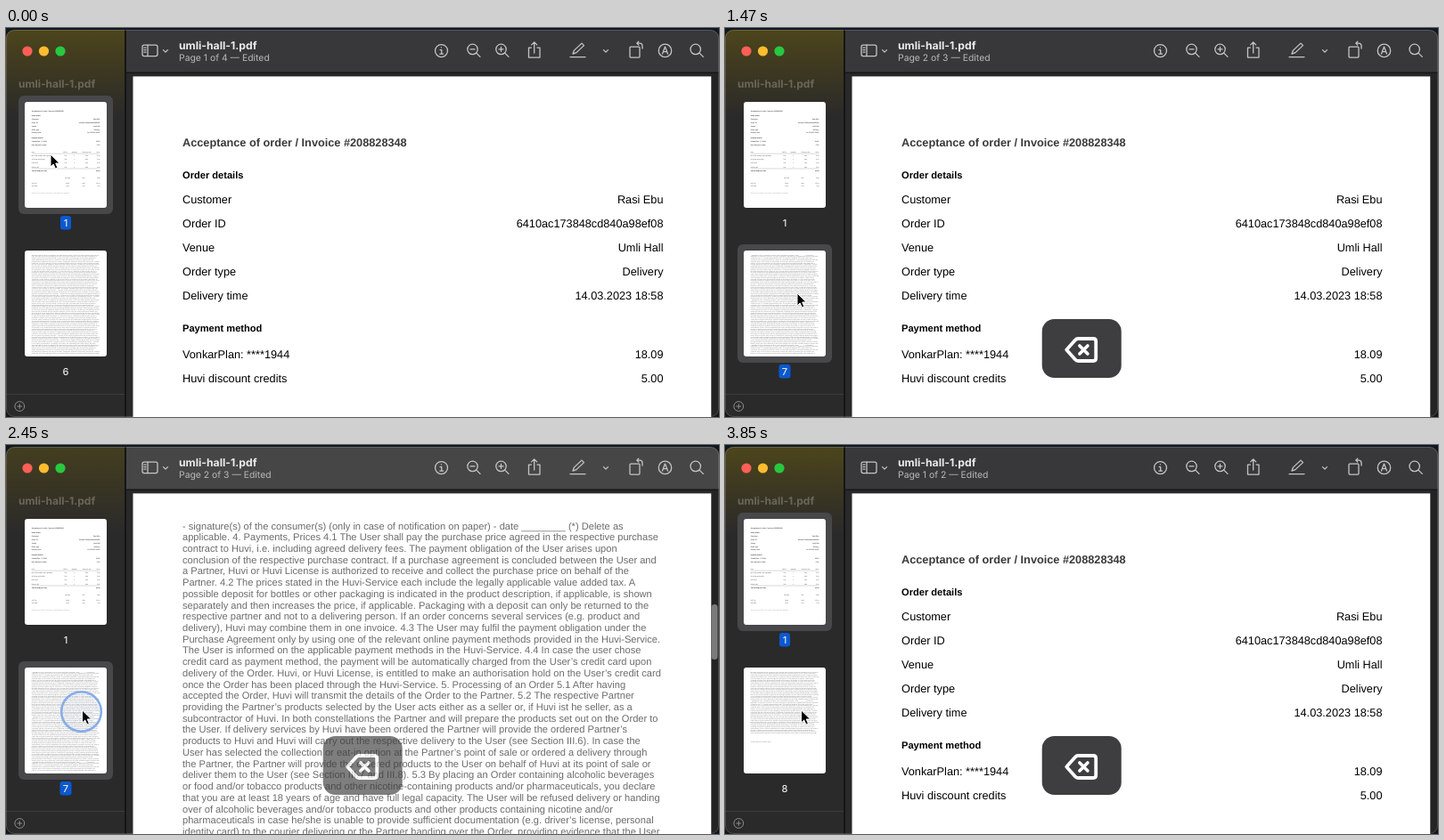
Recreate the animation shown at these times as an HTML page. Size 800x437 px, loop 3.99 s.

```html
<!DOCTYPE html>
<html lang="en">
<head>
<meta charset="utf-8">
<title>Deleting PDF pages</title>
<style>
  html, body { margin: 0; width: 100%; height: 100%; overflow: hidden; background: #0d1822; }
  svg { display: block; width: 800px; height: 437px; text-rendering: geometricPrecision; }
  .ui { font-family: Inter, sans-serif; }
  .doc { font: 12.73px "Liberation Sans", Arial, sans-serif; fill: #000; }
  .doc .title { font-weight: 700; fill: #3a3a3a; }
  .doc .head { font-weight: 700; font-size: 11.1px; }
  .doc .small { font-size: 11.1px; fill: #333; }
  .doc .pale { font-size: 11.1px; fill: #999; }
  .doc .terms { font-size: 11.12px; fill: #6c6c6c; }
  .icons { fill: none; stroke: #c4c4c4; stroke-width: 1.3; stroke-linecap: round; stroke-linejoin: round; }
  .label { font-size: 11px; font-weight: 500; fill: #e8e8e8; text-anchor: middle; }
</style>
</head>
<body>
<svg viewBox="0 0 800 437" xmlns="http://www.w3.org/2000/svg">
  <defs>
    <linearGradient id="olive" x1="0" y1="0" x2="0" y2="1">
      <stop offset="0" stop-color="#4d461c"/>
      <stop offset=".4" stop-color="#3f3a20"/>
      <stop offset="1" stop-color="#2a2a2a"/>
    </linearGradient>
    <clipPath id="frame"><rect y="2" width="800" height="435" rx="9"/></clipPath>
    <clipPath id="sheet"><rect x="143" y="55" width="649" height="839"/></clipPath>
    <g id="invoice" class="doc"><path d="M198 465h539.500M198 584h539.500" stroke="#777" stroke-width="2"/></g>
    <g id="terms6" class="doc"></g>
    <g id="terms7" class="doc"></g>
    <g id="terms8" class="doc"></g>
  </defs>

  <rect width="800" height="437" fill="#0d1822"/>
  <g clip-path="url(#frame)">
    <rect width="800" height="437" fill="#29292a"/>

    <!-- document -->
    <rect x="142.5" y="54.4" width="649" height="383" fill="#fff"/>
    <use id="page" href="#invoice"/>
    <rect x="791.5" y="50" width="8.5" height="387" fill="#242425"/>
    <rect id="scroller" x="791.5" width="7" rx="3.5" fill="#7b7b7b"/>

    <!-- sidebar -->
    <rect width="134" height="437" fill="#2a2a2a"/>
    <rect id="tint" width="134" height="100" fill="url(#olive)"/>
    <path d="M0 411.5H134" stroke="#3c3c3c"/>
    <rect x="133" width="2" height="437" fill="#151515"/>
    <circle cx="24" cy="26" r="5.6" fill="#ff5f57"/>
    <circle cx="42.5" cy="26" r="5.6" fill="#febc2e"/>
    <circle cx="61" cy="26" r="5.6" fill="#28c840"/>
    <text class="ui" x="14" y="67" font-size="12" font-weight="700" fill="#6a675a">umli-hall-1.pdf</text>
    <g fill="none" stroke="#8b8b8b"><circle cx="15.3" cy="425" r="5.4"/><path d="M12.5 425h5.6M15.3 422.2v5.6"/></g>

    <g class="ui">
      <rect id="sel1" x="14" y="76" width="106" height="133" rx="6" fill="#48484a"/>
      <rect id="sel2" x="14" y="243" width="106" height="133" rx="6" fill="#48484a"/>
      <rect x="21" y="83" width="92" height="119" rx="3" fill="#fff"/>
      <rect x="21" y="250" width="92" height="119" rx="3" fill="#fff"/>
      <g transform="translate(21 83) scale(.1418) translate(-143 -55)" clip-path="url(#sheet)"><use href="#invoice"/></g>
      <g transform="translate(21 250) scale(.1418) translate(-143 -55)" clip-path="url(#sheet)"><use id="thumb" href="#terms6"/></g>
      <rect id="badge1" x="61" y="211" width="12" height="15.5" rx="3" fill="#0a59d1"/>
      <rect id="badge2" x="60.5" y="378" width="13" height="15.5" rx="3" fill="#0a59d1"/>
      <text class="label" x="67" y="222.8">1</text>
      <text class="label" id="number" x="67" y="389.8">6</text>
    </g>

    <!-- toolbar -->
    <rect id="bar" x="135" y="2" width="665" height="48"/>
    <rect x="135" y="49.5" width="665" height="1.5" fill="#171717"/>
    <g class="ui">
      <text x="194" y="24" font-size="12.2" font-weight="700" fill="#ececec">umli-hall-1.pdf</text>
      <text id="status" x="194" y="37" font-size="10.4" fill="#b9b9b9"></text>
    </g>
    <g class="icons" transform="translate(0 -.4)">
      <rect x="153" y="19.5" width="17" height="12.5" rx="2"/>
      <path d="M159 19.5v12.5M155 22.5h2M155 25h2M155 27.5h2M176.5 25l2.5 2.5 2.5-2.5M670.5 25l2.5 2.5 2.5-2.5"/>
      <circle cx="488.5" cy="26" r="7"/><path d="M487 25h1.7v4.5M486.8 29.5h3.8M488.4 22.3v.2"/>
      <circle cx="523.5" cy="24.3" r="5.7"/><path d="M527.7 28.5l4.3 4.3M521 24.3h5"/>
      <circle cx="555.5" cy="24.3" r="5.7"/><path d="M559.7 28.5l4.3 4.3M553 24.3h5M555.5 21.8v5"/>
      <path d="M589.5 22.5h-3v11h12.5v-11h-3M592.7 28.5v-12M589.7 19.3l3-3 3 3"/>
      <path d="M636 29.5l1.5-4 8.500-8 2.500 2.500-8.500 8zM633 33h17"/>
      <rect x="700" y="21.5" width="11" height="12" rx="1"/><path d="M708 17.500h3q3 0 3 3v3M709.800 15.500l-2 2 2 2"/>
      <circle cx="739.5" cy="25.8" r="7.2"/><path d="M736.5 29.5l3-8 3 8M737.5 27h4"/>
      <circle cx="773.7" cy="24.3" r="5.7"/><path d="M778 28.5l4.3 4.3"/>
    </g>
    <rect x=".5" y="2.5" width="799" height="434" rx="9" fill="none" stroke="#fff" stroke-opacity=".16"/>

    <!-- key press, click ring, pointer -->
    <g id="key">
      <rect x="-44.5" y="-33" width="89" height="66" rx="14" fill="#3e3e40"/>
      <g fill="none" stroke="#fff" stroke-linecap="round" stroke-linejoin="round">
        <path d="M-17 1.500l10-11.200q1-1.300 3-1.300h17q3 0 3 3v19q0 3-3 3h-17q-2 0-3-1.300z" stroke-width="3.800"/>
        <path d="M-2.300-3l9 9M6.700-3l-9 9" stroke-width="3.600"/>
      </g>
    </g>
    <circle id="ring" cx="84.5" cy="299.5" r="22.3" fill="#a9c3f3" fill-opacity=".08" stroke="#86ade8" stroke-width="2.6"/>
    <path id="pointer" d="M0 0v14l3.200-3 2.200 5 2.500-1.100-2.200-4.900h4.500z" fill="#000" stroke="#fff" stroke-width="1"/>
  </g>
</svg>
<script>
const $ = id => document.getElementById(id);

const revocation = `Agreement will be stored in compliance with data protection laws. 2.4 After the Order has been placed by the
User, the Order cannot be cancelled by the User. You cannot withdraw or cancel an Order for products or
delivery services once you have placed it, unless such right is provided under the Purchase agreement
and/or applicable law. If the User is a consumer within the meaning of Section 13 Velman Title Code
(Velmanisches Titelgesetz) the right of revocation, if applicable, as further referenced in Section III.3. remains
unaffected. 2.5 Prior to placing an Order you should carefully review your selection. Before placing the Order
the User may review and change the details of his/her Order at any time. 2.6 When you use the Huvi-Service,
there may be a minimum value for purchase required, in which case you will be notified thereof before you
place the Order on the Huvi-Service. Where an Order fails to meet the required minimum value, you will have
the possibility to pay the difference to meet the minimum value or to add more products to your Order in order
to reach the minimum value for an Order. 2.7 In the Huvi-Service, if a delivery is made by Huvi, there is a
possibility to assign a tip to the delivering person. A tip is a voluntary service of the User without payment
character, which is passed on by Huvi to the delivering person as intended. After assigning the tip in the Huvi-
Service and placing the Order, the User cannot cancel or claim back a tip determined by him/her. 3. Right of
revocation 3.1 If the User is a consumer within the meaning of Section 13 Velman Title Code (Velmanisches
Titelgesetz), he/she shall be entitled to a right of revocation in accordance with the statutory provisions, of
which Huvi provides more detailed information below. Consumer in this sense (and in the sense of this Terms
of Purchase) is any natural person who uses the Huvi-Service and places Orders for a purpose which can
predominantly not be attributed to his/her commercial or self-employed professional activity. 3.2 The User
who is a consumer shall not have a right for revocation if statutory provisions provide for a respective
exclusion from the right of revocation. For agreements or parts of agreements that fall under the respective
exclusions, the User has no right of revocation. According to statutory law the right of revocation shall, inter
alia, not exist for the following contracts: - contracts for the supply of goods that are not pre-fabricated and
the production of which is governed by an individual choice of or decision by the consumer, or that are clearly
tailored to personal needs of the consumer, - contracts for the supply of goods which are highly perishable, or
which may quickly pass their expiration date, - contracts for the supply of sealed goods which are not suitable
for return due to health protection or hygiene reasons, if such goods were unsealed after delivery, - contracts
for the supply of goods which, according to their nature, are inseparably mixed, after delivery with other`.split('\n');

const payments = `- signature(s) of the consumer(s) (only in case of notification on paper) - date ________ (*) Delete as
applicable. 4. Payments, Prices 4.1 The User shall pay the purchase price agreed in the respective purchase
contract to Huvi, i.e. including agreed delivery fees. The payment obligation of the User arises upon
conclusion of the respective purchase contract. If a purchase agreement is concluded between the User and
a Partner, Huvi or Huvi License is authorized to receive and collect the purchase price on behalf of the
Partner. 4.2 The prices stated in the Huvi-Service each include the legally applicable value added tax. A
possible deposit for bottles or other packaging is indicated in the product description, if applicable, is shown
separately and then increases the price, if applicable. Packaging with a deposit can only be returned to the
respective partner and not to a delivering person. If an order concerns several services (e.g. product and
delivery), Huvi may combine them in one invoice. 4.3 The User may fulfil the payment obligation under the
Purchase Agreement only by using one of the relevant online payment methods provided in the Huvi-Service.
The User is informed on the applicable payment methods in the Huvi-Service. 4.4 In case the user chose
credit card as payment method, the payment will be automatically charged from the User’s credit card upon
delivery of the Order. Huvi, or Huvi License, is entitled to make an authorisation hold on the User’s credit card
once the Order has been placed through the Huvi-Service. 5. Processing of an Order 5.1 After having
accepted the Order, Huvi will transmit the details of the Order to the Partner. 5.2 The respective Partner
providing the Partner’s products selected by the User acts either as a seller or, if Huvi ist he seller, as a
subcontractor of Huvi. In both constellations the Partner and will prepare the products set out on the Order to
the User. If delivery services by Huvi have been ordered the Partner will provide the ordered Partner’s
products to Huvi and Huvi will carry out the respective delivery to the User (see Section III.6). In case the
User has selected the collection or eat-in option at the Partner’s point of sale or ordered a delivery through
the Partner, the Partner will provide the ordered products to the User on behalf of Huvi at its point of sale or
deliver them to the User (see Section III.7 and III.8). 5.3 By placing an Order containing alcoholic beverages
or food and/or tobacco products and other nicotine-containing products and/or pharmaceuticals, you declare
that you are at least 18 years of age and have full legal capacity. The User will be refused delivery or handing
over of alcoholic beverages and/or tobacco products and other products containing nicotine and/or
pharmaceuticals in case he/she is unable to provide sufficient documentation (e.g. driver’s license, personal
identity card) to the courier delivering or the Partner handing over the Order, providing evidence that the User`.split('\n');

function write(parent, text, x, y, cls = '', anchor = 'start') {
  const el = document.createElementNS('http://www.w3.org/2000/svg', 'text');
  el.textContent = text;
  el.setAttribute('x', x);
  el.setAttribute('y', y);
  el.setAttribute('class', cls);
  el.setAttribute('text-anchor', anchor);
  parent.append(el);
}

function fillTerms(id, lines, count, start = 0) {
  for (let i = 0; i < count; i++)
    write($(id), lines[(i + start) % lines.length], 198, 94.5 + i * 12.72, 'terms');
}

function fillInvoice() {
  const g = $('invoice');
  const row = (y, left, right, cls) => {
    write(g, left, 198, y, cls);
    write(g, right, 737.5, y, cls, 'end');
  };
  const cells = (y, centers, ...texts) =>
    texts.forEach((s, i) => write(g, s, centers[i], y, 'small', 'middle'));
  const itemCols = [465, 535, 633], taxCols = [482, 608];

  write(g, 'Acceptance of order / Invoice #208828348', 198, 132.7, 'title');
  write(g, 'Order details', 198, 168.7, 'head');
  row(197, 'Customer', 'Rasi Ebu');
  row(224, 'Order ID', '6410ac173848cd840a98ef08');
  row(251, 'Venue', 'Umli Hall');
  row(278, 'Order type', 'Delivery');
  row(305, 'Delivery time', '14.03.2023 18:58');
  write(g, 'Payment method', 198, 341, 'head');
  row(370.5, 'VonkarPlan: ****1944', '18.09');
  row(397.5, 'Huvi discount credits', '5.00');

  row(458, 'Item', 'Price', 'small');
  cells(458, itemCols, 'VAT %', 'Quantity', 'Price per unit');
  ['M1 Fried noodles with vegetables', 'S4 Crispy spring rolls', 'Rice bowl', 'Delivery fee'].forEach((s, i) => {
    const y = 487 + i * 29;
    row(y, s, '5.90', 'small');
    cells(y, itemCols, '7.00', '1', '5.90');
  });
  row(603, 'Total in EUR (incl. VAT)', '23.09', 'head');
  row(663, '', 'Total', 'small');
  cells(663, taxCols, 'Net total', 'VAT');
  row(701, 'VAT 7%', '15.19', 'small');
  cells(701, taxCols, '14.20', '0.99');
  row(728, 'VAT 19%', '7.90', 'small');
  cells(728, taxCols, '6.64', '1.26');
  write(g, 'All prices are in EUR. The invoice is valid without a signature.', 198, 778, 'pale');
}

fillInvoice();
fillTerms('terms6', revocation, 62);
fillTerms('terms7', payments, 62);
fillTerms('terms8', payments, 39, 10);
write($('terms8'), 'Version valid from 1 March 2023', 198, 647, 'terms');

const LOOP = 3990, STEP = 70;
const deletes = [1330, 3080], clicks = [630, 2380];

// start, selected page, page count, second thumbnail, shown page
const states = [
  [0, 1, 4, 6, 'invoice'],
  [630, 2, 4, 6, 'terms6'],
  [1330, 2, 3, 7, 'invoice'],
  [1820, 1, 3, 7, 'invoice'],
  [2380, 2, 3, 7, 'terms7'],
  [3080, 2, 2, 8, 'invoice'],
  [3570, 1, 2, 8, 'invoice']
];

const clamp = v => Math.min(1, Math.max(0, v));
const ramp = (t, a, b) => clamp((t - a) / (b - a));
const ease = p => p * p * (3 - 2 * p);
const show = (id, on) => $(id).setAttribute('opacity', +on);
let current;

function setState(state) {
  if (state === current) return;
  current = state;
  const [, selected, count, number, shown] = state;
  const scrolled = shown !== 'invoice';
  $('status').textContent = `Page ${selected} of ${count} — Edited`;
  $('number').textContent = number;
  $('page').setAttribute('href', '#' + shown);
  $('thumb').setAttribute('href', '#terms' + number);
  $('bar').setAttribute('fill', scrolled ? '#464647' : '#38383a');
  show('tint', scrolled ? .75 : 1);
  for (const i of [1, 2]) {
    show('sel' + i, selected === i);
    show('badge' + i, selected === i);
  }
  show('scroller', scrolled);
  $('scroller').setAttribute('y', count === 4 ? 147 : 179);
  $('scroller').setAttribute('height', count === 4 ? 47 : 62);
}

function draw(t) {
  setState(states.findLast(s => s[0] <= t));

  const down = ease(ramp(t, 0, 490)), nudge = ease(ramp(t, 1680, 2030));
  $('pointer').setAttribute('transform', `translate(${50 + 31 * down + 4.5 * nudge} ${142 + 156 * down})`);

  const click = clicks.findLast(c => c <= t);
  show('ring', click === undefined ? 0 : 1 - ramp(t, click + 110, click + 260));

  const press = deletes.findLast(d => d <= t);
  const pop = press === undefined ? 0 : ramp(t, press, press + 140);
  const fade = press === undefined ? 0 : 1 - ramp(t, press + 1050, press + 1260);
  $('key').setAttribute('transform', `translate(400.2 360) scale(${.7 + .3 * pop})`);
  show('key', Math.min(1, .5 + pop) * fade);
}

function tick() {
  const t = performance.now() % LOOP;
  draw(Math.floor(t / STEP) * STEP);
  requestAnimationFrame(tick);
}
tick();
</script>
</body>
</html>
```
